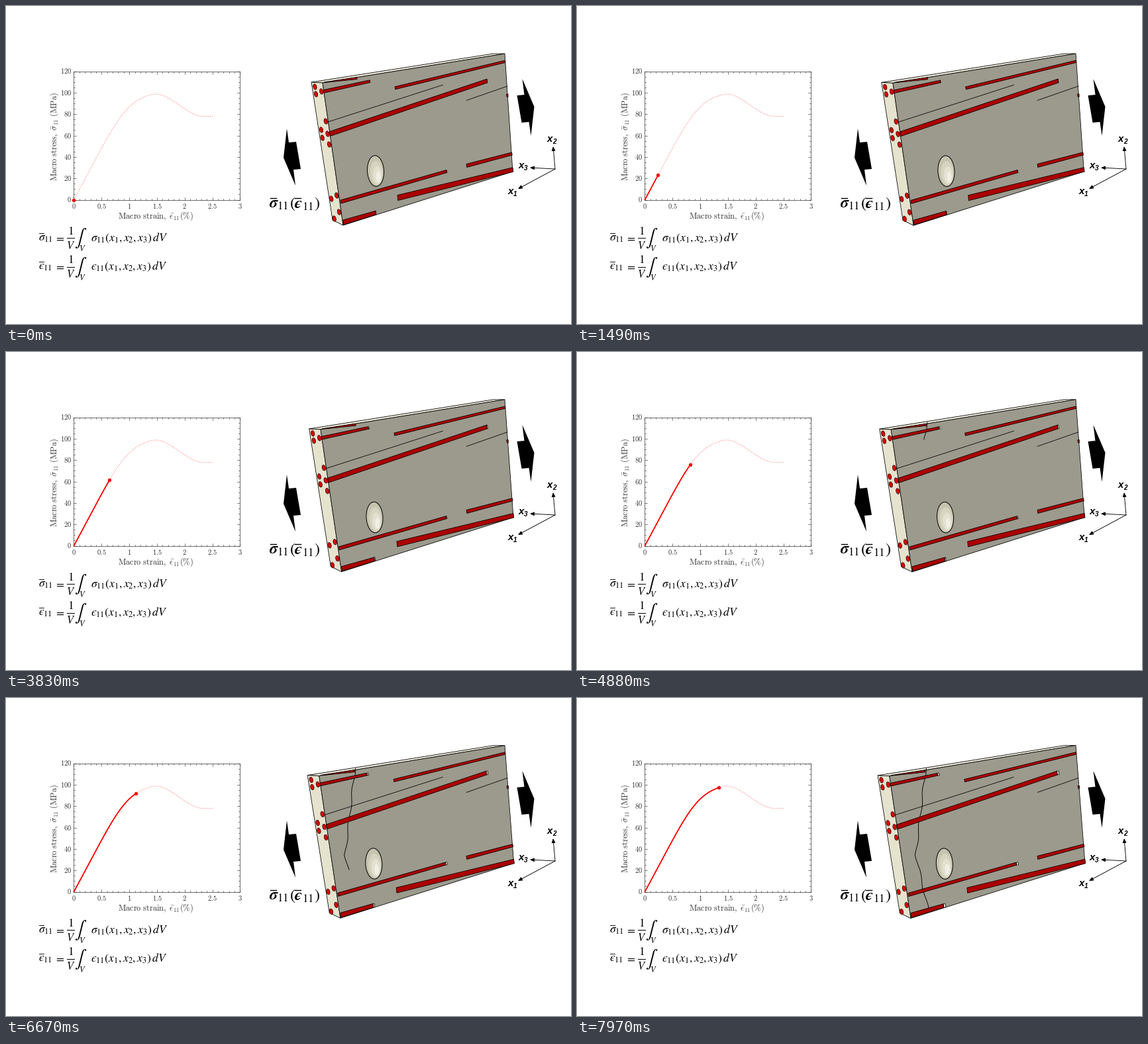
Recreate the animation shown at these times as a matplotlib script. Size 853 by 480 pixels, loop 8 s.

```python
import math

import numpy as np
import matplotlib.pyplot as plt
from matplotlib.animation import FuncAnimation
from matplotlib.patches import Ellipse, Polygon

W, H, DPI = 853, 480, 64
PT = 72 / DPI                      # points per pixel
FRAMES, INTERVAL = 200, 40
LAST_STEP = 106
STRAIN_PER_STEP, MAX_STRAIN = 0.01258, 2.52

RED, DARK_RED, INK = "#ff0000", "#ac0000", "#333333"
FRONT, SIDE, TOP = "#9c9a8d", "#e5e2ce", "#e9e6d8"

plt.rcParams["mathtext.fontset"] = "stix"
fig = plt.figure(figsize=(W / DPI, H / DPI), dpi=DPI, facecolor="white")
ax = fig.add_axes([0, 0, 1, 1])
ax.set(xlim=(0, W), ylim=(H, 0))
ax.axis("off")


def write(x, y, text, size, **style):
    style = {"ha": "left", "va": "baseline", "color": "black", **style}
    return ax.text(x, y, text, fontsize=size * PT, **style)


def line(xs, ys, width=1.0, color="black", **style):
    return ax.plot(xs, ys, lw=width * PT, color=color, **style)[0]


# --- stress-strain chart ---------------------------------------------------
LEFT, RIGHT, CEILING, FLOOR = 102.5, 353.5, 98.5, 292.5


def chart_x(strain):
    return LEFT + (RIGHT - LEFT) * strain / 3


def chart_y(stress):
    return FLOOR - (FLOOR - CEILING) * stress / 120


def stress_at(strain):
    """Linear rise saturating at a plateau, then a smooth softening."""
    elastic = 97 * strain
    rise = elastic / (1 + (elastic / 102.7) ** 5) ** 0.2
    t = np.clip((strain - 1.4) / 0.95, 0, 1)
    return rise - 24.5 * t * t * (3 - 2 * t)


def curve(end):
    s = np.linspace(0, end, 160)
    return chart_x(s), chart_y(stress_at(s))


def build_chart():
    xs, ys = [], []
    for i in range(31):
        x, size = chart_x(i / 10), 2 if i % 5 else 4
        xs += [x, x, np.nan] * 2
        ys += [FLOOR, FLOOR - size, np.nan, CEILING, CEILING + size, np.nan]
    for i in range(25):
        y, size = chart_y(5 * i), 2 if i % 4 else 4
        xs += [LEFT, LEFT + size, np.nan, RIGHT, RIGHT - size, np.nan]
        ys += [y, y, np.nan] * 2
    line(xs, ys, 0.6, INK)
    line([LEFT, RIGHT, RIGHT, LEFT, LEFT],
         [CEILING, CEILING, FLOOR, FLOOR, CEILING], 0.7, INK)

    cm = {"math_fontfamily": "cm", "color": INK}
    for i in range(7):
        write(chart_x(i / 2), 305.5, f"${i / 2:g}$", 10.5, ha="center", **cm)
        write(99, chart_y(20 * i), f"${20 * i}$", 10.5, ha="right",
              va="center", **cm)
    write(225.5, 321, r"$\mathrm{Macro\ strain,\ }\bar{\epsilon}_{11}(\%)$",
          12.4, ha="center", **cm)
    write(73, 197.5, r"$\mathrm{Macro\ stress,\ }\bar{\sigma}_{11}"
          r"\mathrm{\ (MPa)}$", 12.4, ha="center", va="center", rotation=90, **cm)
    line(*curve(MAX_STRAIN), 0.9, "#ff5050", ls=(0, (1, 2)))


# --- formulas --------------------------------------------------------------
def average_formula(y, symbol):
    base = y + 4.5
    write(49, base, rf"${symbol}_{{11}}$", 17.5)
    line([50, 57], [y - 7.5] * 2, 0.9)
    write(80.5, base, "$=$", 17.5, ha="center")
    write(97.5, y - 5, "$1$", 17.5, ha="center")
    line([92, 103.5], [y, y], 1)
    write(97.5, y + 17, "$V$", 16.5, ha="center")
    write(112.5, y + 1, r"$\int$", 27, ha="center", va="center")
    write(115.5, y + 20, "$V$", 12.5, ha="center")
    write(128.5, base, rf"${symbol}_{{11}}(x_1,x_2,x_3)\,dV$", 17.5)


def build_formulas():
    average_formula(350, r"\sigma")
    average_formula(393.5, "\u03f5")
    write(397, 305, r"$\mathbfit{\sigma}_{11}$", 24)
    write(428, 305, "$(\\mathbfit{\u03f5}_{11})$", 24)
    for x in (399, 436):
        line([x, x + 9], [289.5] * 2, 1.4)


# --- load arrows and axis triad --------------------------------------------
def build_arrows():
    arrow = np.array([(-8, -43), (-5, -22), (6, -23), (13, 18), (2, 19),
                      (5, 43), (-13, 1)])
    for center, turn in (((432, 228), 1), ((784.5, 153), -1)):
        ax.add_patch(Polygon(center + turn * arrow, fc="black", lw=0))

    font = {"family": "Liberation Sans", "weight": "bold", "style": "italic"}
    for digit, tip, (x, y) in ((1, (773, 276), (758, 284)),
                               (2, (826, 212), (817, 205)),
                               (3, (791, 244), (774, 245))):
        ax.annotate("", tip, (829, 246), arrowprops=dict(
            arrowstyle="-|>,head_length=0.5,head_width=0.22", color="black",
            lw=0.9 * PT, shrinkA=0, shrinkB=0, mutation_scale=12))
        write(x, y, "x", 15, **font)
        write(x + 8, y + 3, str(digit), 10, **font)


# --- deforming block -------------------------------------------------------
moving = []


def stretch(points):
    """Where points of the block end up after the whole pull."""
    points = np.array(points, float)
    x, y = points[..., 0], points[..., 1]
    pulled = -7 * (np.maximum(700 - x, 0) / 239) ** 1.5
    pushed = 0.03 * np.maximum(x - 700, 0) * (y - 72) / 178
    return np.stack([x + pulled + pushed, y + 0.008 * (700 - x)], axis=-1)


def shape(points, fill=None, width=0.8, z=1, end=None):
    start = np.array(points, float)
    patch = Polygon(start, closed=fill is not None, fill=fill is not None,
                    fc=fill, ec="black", lw=width * PT, zorder=z)
    ax.add_patch(patch)
    moving.append((patch.set_xy, start, stretch(start) if end is None else end))


def disc(center, width, height, fill, angle, edge=0.0, z=2):
    start = np.array(center, float)
    patch = Ellipse(start, width, height, angle=angle, fc=fill, zorder=z,
                    ec="black" if edge else "none", lw=edge * PT)
    ax.add_patch(patch)
    moving.append((patch.set_center, start, stretch(start)))


def fibre(x0, y0, x1, y1, h):
    """Tapered bar on the front face; inner ends slip and leave a hole."""
    bar = np.array([(x0, y0 - h / 2), (x1, y1 - 0.4 * h),
                    (x1 + 0.8, y1 + 0.4 * h), (x0 + 0.8, y0 + h / 2)])
    end = stretch(bar)
    if x1 < 740:
        rim = end[1:3] + (1, 0)
        end[1:3] -= (1.7, -0.4)
        shape([*bar[1:3], *bar[2:0:-1]], TOP, 0.7,
              end=np.array([*end[1:3], *rim[::-1]]))
        moving[-1][1][:] = [*bar[1:3], *bar[2:0:-1]]
    shape(bar, DARK_RED, z=2, end=end)


def build_block():
    back_top, back_low = (461, 115), (493, 323)
    top_left, top_right = (478, 116), (753, 72)
    low_left, low_right = (509, 331), (765, 250)
    shape([back_top, (735, 72), top_right, top_left], TOP)
    shape([back_top, top_left, low_left, back_low], SIDE)
    shape([top_left, top_right, low_right, low_left], FRONT)

    shape([(480, 115), (530, 107.5), (530, 110.5), (486, 115)], DARK_RED, z=2)
    shape([(755.5, 133), (758, 133), (758, 137.5), (756, 137)], DARK_RED, z=2)
    shape([(486, 175), (660, 119)], z=2)
    shape([(695, 142.5), (757, 121)], z=2)

    fibre(479, 129, 549, 113.7, 4.5)
    fibre(587, 123.8, 753, 83.8, 4)
    fibre(488.5, 193, 726, 113, 7)
    fibre(505, 295.5, 665, 249.5, 5)
    fibre(695, 241, 763.5, 223, 5)
    fibre(591, 289.5, 765, 247, 8)
    fibre(509, 326.5, 558, 312, 7)

    # cut fibre ends alternate left and right of the side face's midline
    heights = (122, 129, 133, 174, 187, 193, 199, 209, 291, 286, 321, 311)
    for i, y in enumerate(heights):
        x = 470 + 0.147 * (y - 116) + (4.2 if i % 2 else -4.5)
        disc((x, y), 5.2, 8.6, "#dc0000", -14, 0.6, 3)

    # spherical void, lighter towards its lower right
    for i, tone in enumerate(("#c6c3af", "#d6d3c0", "#e4e1d1", "#f0eee4")):
        disc((558 + 1.4 * i, 249 + 3 * i), 25 - 6 * i, 46.5 - 10 * i, tone, -3,
             0 if i else 1)


build_chart()
build_formulas()
build_arrows()
build_block()

crack_y = np.linspace(106, 318, 213)
crack_x = np.interp(crack_y, [106, 237, 318], [526.5, 511.5, 530])
crack_x += 1.3 * np.sin(crack_y / 8)
crack = line([], [], 0.9, zorder=1.5)

progress = line([], [], 1.8, RED, zorder=4)
marker = line([], [], 0, RED, marker="o", ms=4.6 * PT, mec="#e00000",
              mew=0.8 * PT, zorder=5)


def step_time(step):
    """Steps last 60 ms, with a longer 130 ms one about every fifth."""
    return 60 * step + 70 * math.floor(0.2125 * step + 0.968)


STEP_TIMES = [step_time(i) for i in range(1, LAST_STEP + 1)]


def draw(frame):
    step = int(np.searchsorted(STEP_TIMES, frame * INTERVAL + 30, side="right"))
    u = step / LAST_STEP
    for place, start, end in moving:
        place(start + u * (end - start))

    # the crack runs down at a steady speed once it has opened
    shown = crack_y <= 106 + 5.3 * (step - 60)
    crack.set_data(crack_x[shown] + 3 * (1 - u), crack_y[shown])

    xs, ys = curve(step * STRAIN_PER_STEP)
    progress.set_data(xs, ys)
    marker.set_data(xs[-1:], ys[-1:])
    return [crack, progress, marker]


animation = FuncAnimation(fig, draw, frames=FRAMES, interval=INTERVAL,
                          repeat=True, repeat_delay=0, blit=False)
plt.show()
```
